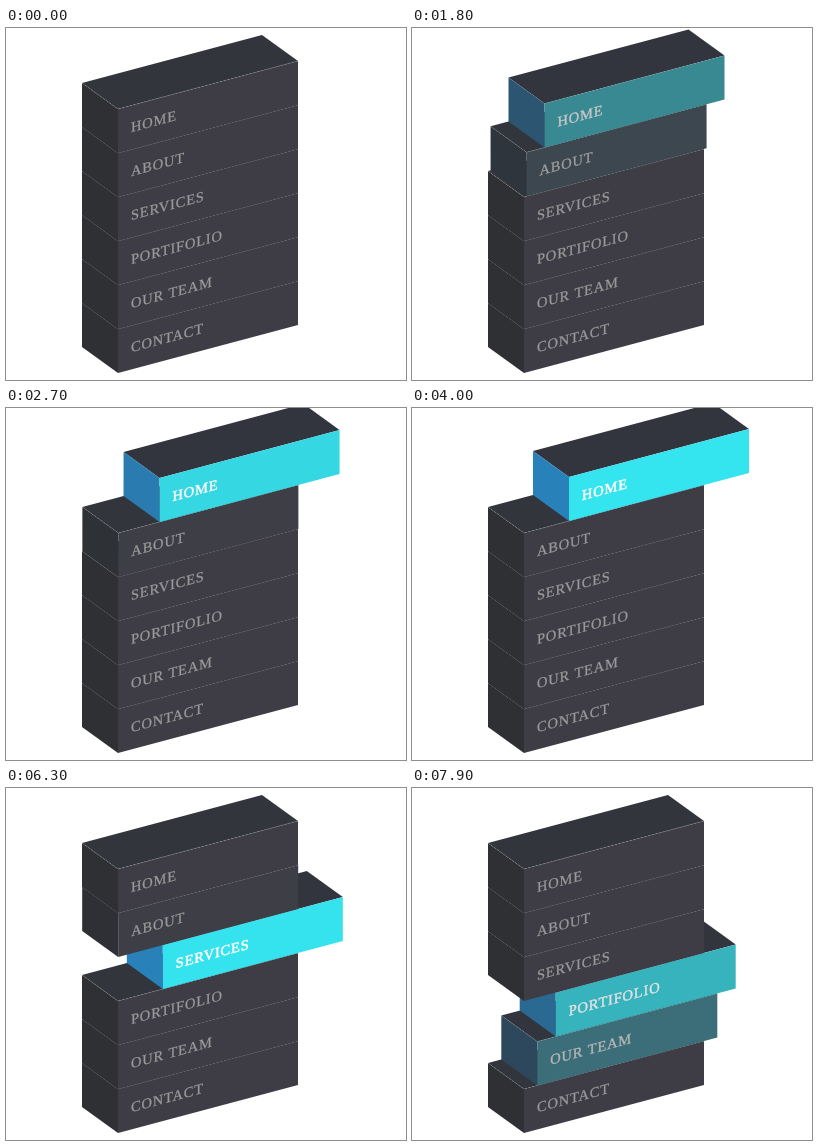
These frames come from a looping animation (400x352 px, 8000 ms). An HTML page with a canvas:

```html
<!DOCTYPE html>
<html lang="en">
<head>
<meta charset="utf-8">
<title>Isometric menu</title>
<style>
  html, body { margin: 0; width: 100%; height: 100%; overflow: hidden; background: #fff; }
  canvas { display: block; }
</style>
</head>
<body>
<canvas id="stage" width="400" height="352"></canvas>
<script>
const ctx = document.getElementById('stage').getContext('2d');
const LOOP = 8000, STEP = 100;
const LABELS = ['HOME', 'ABOUT', 'SERVICES', 'PORTIFOLIO', 'OUR TEAM', 'CONTACT'];

// front top corner of the stack, and the three edges of one bar
const X = 112, Y = 81, W = 180, ROW = 44, SHIFT = 45;
const SLOPE = -4 / 15;
const ALONG = [W, W * SLOPE], BACK = [-36, -26], DOWN = [0, ROW];

// colours at rest and when hovered
const FRONT = [0x3e3d46, 0x34e4ef];
const SIDE = [0x2e3034, 0x2981ba];
const TOP = [0x32353c, 0x33353e];
const TEXT = [0x999999, 0xffffff];

// the pointer's path: item entered, when, and how long its transition takes
const SLOW = 2300, FAST = 700;
const VISITS = [
  [1, 930, SLOW], [0, 1175, SLOW],
  [1, 4360, FAST], [2, 5660, FAST], [3, 6860, FAST], [4, 7760, FAST]
];

const bezier = (a, b, u) => 3 * a * u * (1 - u) ** 2 + 3 * b * u * u * (1 - u) + u ** 3;

// the CSS "ease" curve
function ease(x) {
  if (x >= 1) return 1;
  let lo = 0, hi = 1;
  for (let i = 0; i < 24; i++) {
    const mid = (lo + hi) / 2;
    if (bezier(0.25, 0.25, mid) < x) lo = mid; else hi = mid;
  }
  return bezier(0.1, 1, lo);
}

// every visit pulls its own item out and lets the others slide back
function hoverAt(item, t) {
  return VISITS.reduce((value, [id, start, span], i) => {
    const end = Math.min(t, i + 1 < VISITS.length ? VISITS[i + 1][1] : LOOP);
    if (end <= start) return value;
    const goal = id === item ? 1 : 0;
    return value + (goal - value) * ease((end - start) / span);
  }, 0);
}

function mix([a, b], k) {
  const channel = s => {
    const from = a >> s & 255, to = b >> s & 255;
    return Math.round(from + (to - from) * k);
  };
  return `rgb(${channel(16)},${channel(8)},${channel(0)})`;
}

// parallelogram spanned by two edges from the bar's corner
function face(color, [ax, ay], [bx, by]) {
  ctx.beginPath();
  ctx.moveTo(0, 0);
  ctx.lineTo(ax, ay);
  ctx.lineTo(ax + bx, ay + by);
  ctx.lineTo(bx, by);
  ctx.closePath();
  ctx.fillStyle = color;
  ctx.fill();
}

function drawSeam(alpha) {
  ctx.beginPath();
  ctx.moveTo(...BACK);
  ctx.lineTo(0, 0);
  ctx.lineTo(...ALONG);
  ctx.lineWidth = 0.8;
  ctx.setLineDash([2, 1.75]);
  ctx.strokeStyle = `rgba(210,210,210,${alpha})`;
  ctx.stroke();
  ctx.setLineDash([]);
}

function drawLabel(label, hover) {
  ctx.transform(1, SLOPE, 0, 1, 0, 0);
  ctx.font = '14.5px "Liberation Serif", "Times New Roman", serif';
  ctx.letterSpacing = '0.8px';
  ctx.fillStyle = ctx.strokeStyle = mix(TEXT, hover);
  ctx.lineWidth = 0.25 + 0.25 * hover;
  ctx.fillText(label, 13, 26.7);
  ctx.strokeText(label, 13, 26.7);
}

function drawItem(i, hover) {
  const dx = SHIFT * hover;
  ctx.save();
  ctx.translate(X + dx, Y + dx * SLOPE + i * ROW);
  face(mix(TOP, hover), ALONG, BACK);
  face(mix(SIDE, hover), BACK, DOWN);
  face(mix(FRONT, hover), ALONG, DOWN);
  drawSeam(0.32 * (1 - hover));
  drawLabel(LABELS[i], hover);
  ctx.restore();
}

function draw(t) {
  ctx.fillStyle = '#fff';
  ctx.fillRect(0, 0, 400, 352);
  for (let i = LABELS.length - 1; i >= 0; i--) drawItem(i, hoverAt(i, t));
}

let origin = null;
function tick(now) {
  if (origin === null) origin = now;
  const t = (now - origin) % LOOP;
  draw(Math.floor(t / STEP) * STEP);
  requestAnimationFrame(tick);
}
draw(0);
requestAnimationFrame(tick);
</script>
</body>
</html>
```
